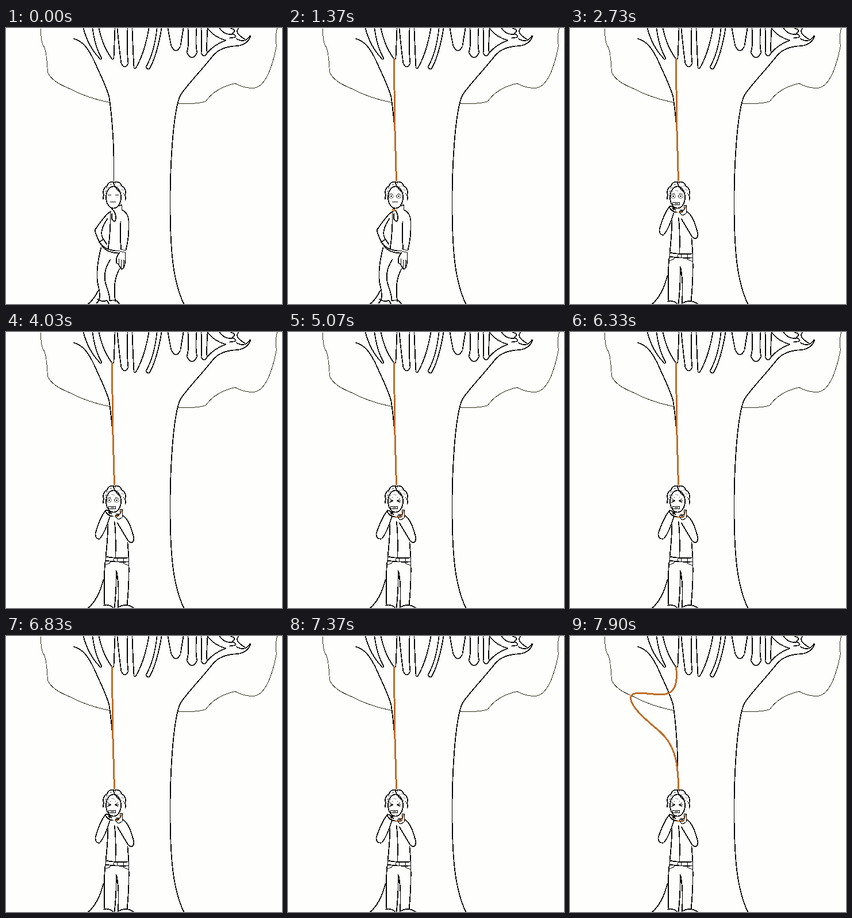
Animation of 480 by 480 pixels, one loop 8 s. Source, as an HTML page:

```html
<!DOCTYPE html>
<html lang="en">
<head>
<meta charset="utf-8">
<title>Man under a tree</title>
<style>
  html, body { margin: 0; width: 100%; height: 100%; overflow: hidden; background: #fefefc; }
  svg { display: block; width: 100vw; height: 100vh; }
  path, ellipse { fill: none; stroke: #000; stroke-width: 1.7; stroke-linejoin: round; shape-rendering: crispEdges; }
  .thin, .leaf { stroke-width: 1; }
  .leaf { stroke: #2a2a18; }
  .rope { stroke: #bc6f2a; stroke-width: 3; }
  .noose { stroke: #bc6f2a; stroke-width: 2; }
  .dot { fill: #000; stroke: none; }
</style>
</head>
<body>
<!-- Coordinates name pixel centres -->
<svg id="stage" viewBox="-.5 -.5 480 480"></svg>
<script>
const stage = document.getElementById("stage");

function add(parent, tag, attrs = {}) {
  const el = document.createElementNS("http://www.w3.org/2000/svg", tag);
  for (const key in attrs) el.setAttribute(key, attrs[key]);
  return parent.appendChild(el);
}
const group = () => add(stage, "g");
const path = (g, d, cls = "") => add(g, "path", { d, class: cls });
const oval = (g, cx, cy, rx, ry = rx, cls = "") => add(g, "ellipse", { cx, cy, rx, ry, class: cls });

// A branch hanging from the top edge: width w at x, rounded tip of radius r
function branch(g, x, w, tipX, tipY, r) {
  const side = edge => `${edge * .7 + tipX * .3} ${tipY * .6}`;
  path(g, `M${x} 0Q${side(x)} ${tipX - r} ${tipY - r}Q${tipX} ${tipY + r} ${tipX + r} ${tipY - r}Q${side(x + w)} ${x + w} 0`);
}

function drawTree() {
  const g = group();
  path(g, "M60 0Q60 24 65 31T72 77Q80 93 108 104Q142 122 180 129", "leaf");
  path(g, "M471 0Q467 18 470 30Q456 103 429 104Q413 104 398 96Q364 103 347 127Q334 132 298 131", "leaf");
  path(g, "M117 18C131 22 141 31 153 57C164 82 175 103 179 120C184 155 188 205 187 266");
  path(g, "M425 13C421 25 412 31 396 31C375 33 365 40 356 52C335 78 315 98 303 116C290 142 285 240 285 300C285 390 290 440 309 480");
  branch(g, 134, 16, 164, 54, 2);
  branch(g, 161, 28, 185, 54, 2);
  branch(g, 193, 18, 206, 67, 6);
  branch(g, 219, 29, 224, 70, 2);
  branch(g, 262, 8, 247, 71, 4);
  branch(g, 281, 27, 295, 39, 8);
  branch(g, 316, 15, 323, 51, 9);
  branch(g, 339, 11, 344, 48, 5);
  path(g, "M349 43Q362 28 382 21Q362 16 350 0M371 0Q380 13 395 10");
  path(g, "M390 0Q402 3 393 9Q407 16 388 17M404 0Q396 8 415 19M424 13Q415 27 400 18");
}

function drawHead() {
  const g = group();
  oval(g, 186.5, 294, 13, 19);
  let hair = "";
  for (let a = 0.9 * Math.PI; a <= 2.14 * Math.PI; a += 0.05) {
    const lobe = 0.95 + 0.09 * Math.abs(Math.sin(a * 4));
    hair += `${hair ? "L" : "M"}${188 + 19.5 * lobe * Math.cos(a)} ${290 + 23 * lobe * Math.sin(a)}`;
  }
  path(g, hair);
  path(g, "M186 268Q190 280 200 287");
  for (let i = 0; i < 12; i++) {
    const a = Math.PI * (1.05 + i * 0.082);
    oval(g, 188 + 16.5 * Math.cos(a), 290 + (i % 2 ? 16 : 20) * Math.sin(a), 0.7, 0.7, "dot");
  }
}

function drawCalm() {
  const g = group();
  // Jacket, arm on the hip, hanging arm
  path(g, "M183 313Q194 324 189 336Q181 334 184 322M181 318Q182 350 177 385");
  path(g, "M182 318Q172 324 154 351Q156 361 165 377M176 331Q160 354 169 367L175 376M161 372L169 367");
  path(g, "M195 309L201 307V316Q212 320 213 336Q214 362 208 386M199 336Q197 360 200 385");
  // Belt and hand
  path(g, "M164 374Q174 388 198 387M166 378Q175 391 197 391");
  path(g, "M198 384L209 387M198 388L208 390", "thin");
  path(g, "M197 390Q189 400 192 409Q195 408 199 418Q208 422 207 390");
  path(g, "M196 400V412M200 402V418M204 402V416", "thin");
  // Legs, feet, root
  path(g, "M165 381Q154 424 160 448T157 478M181 402Q166 425 174 448T179 474M197 418Q184 442 190 476");
  path(g, "M158 471Q168 477 175 473L179 480M180 474Q192 470 197 480M142 480Q152 472 160 456");
  path(g, "M180 302H190", "thin");
  return g;
}

function drawStanding() {
  const g = group();
  // Jacket, belt, pockets
  path(g, "M177 334Q176 365 173 390M188 329Q191 345 190 392M211 365L213 392");
  path(g, "M173 390Q190 394 213 392V400M172 397Q190 400 213 399M173 390V399M187 393V399M193 393V399M204 393V399");
  path(g, "M172 404Q180 403 182 398M203 400Q205 404 213 405", "thin");
  // Legs, feet, root
  path(g, "M172 399Q169 430 171 476M213 400Q214 435 210 476M191 414Q192 445 188 480M192 416Q197 445 194 480");
  path(g, "M169 475Q178 472 186 479M195 478Q210 470 222 480M142 480Q160 465 169 430");
  path(g, "M178 303H190V307H178ZM181 305H187", "thin");
  for (let i = 0; i < 5; i++) oval(g, 178 + i * 3, 284 + 3 * Math.sin(i * 2), 0.6, 0.6, "dot");
  return g;
}

// Both hands at the neck; pull is 0 or 1
function drawArms(pull) {
  const g = group();
  const elbow = 155 - 2 * pull, y = 318 + pull;
  path(g, pull ? "M179 319Q188 323 197 321L201 309" : "M189 321Q202 316 200 308", "noose");
  path(g, `M174 309Q164 318 ${elbow} 350Q${elbow} 361 163 359Q173 345 180 321`);
  path(g, "M203 319Q214 325 222 358Q221 370 212 363L193 331");
  path(g, `M172 ${y - 7}Q177 ${y + 2} 186 ${y + 2}M174 ${y - 9}L183 ${y - 5}M177 ${y - 5}L184 ${y - 2}M178 ${y}L181 ${y - 6}`);
  path(g, `M190 ${y}Q193 ${y + 12} 202 ${y + 3}V${y - 10}H198V${y - 2}ZM191 ${y - 3}L197 ${y + 2}M194 ${y - 4}V${y + 3}`, "thin");
  return g;
}

function drawEyes() {
  const shut = group(), open = group(), squeeze = group();
  for (const x of [179, 192]) {
    path(shut, `M${x - 3} 290H${x + 3}`, "thin");
    oval(open, x, 292, 3.7, 3.7, "thin");
    oval(open, x, 292, 1.2, 1.2, "dot");
    const out = Math.sign(x - 186) * 3;
    path(squeeze, `M${x + out} 289L${x - out} 293L${x + out} 296M${x + out} 293H${x - out}`, "thin");
  }
  return { shut, open, squeeze };
}

drawTree();
const taut = path(stage, "M184 53L185 160L188 266", "rope");
const slack = path(stage, "M184 53C187 78 184 101 160 101C135 102 106 92 105 107C105 125 140 152 155 165C180 187 188 215 188 266", "rope");
drawHead();
const calm = drawCalm();
const calmNoose = path(stage, "M181 314L183 319L185 315", "noose");
const standing = drawStanding(), hold = drawArms(0), pull = drawArms(1), eyes = drawEyes();

const LOOP = 8000, ROPE = 667, WAKE = 1333, GRAB = 2000, HURRY = 5000, WINCE = 5833, LOOSE = 7833;
const show = (el, on) => { el.style.display = on ? "" : "none"; };

function render(t) {
  const grabbed = t >= GRAB, loose = t >= LOOSE;
  // Tugs alternate three times a second, then six
  const beat = t < HURRY ? Math.floor((t - GRAB) * 3 / 1000) : 9 + Math.floor((t - HURRY) * 6 / 1000);
  const pulling = grabbed && (loose || beat % 2 === 1);
  const wincing = pulling || t >= WINCE;

  show(taut, t >= ROPE && !loose);
  show(slack, loose);
  show(calm, !grabbed);
  show(calmNoose, t >= ROPE && !grabbed);
  show(standing, grabbed);
  show(hold, grabbed && !pulling);
  show(pull, pulling);
  show(eyes.shut, t < WAKE);
  show(eyes.open, t >= WAKE && !wincing);
  show(eyes.squeeze, wincing);
}

const start = performance.now();
function tick() {
  // Small lead keeps changes on their 10 ms marks
  render((performance.now() - start + 4) % LOOP);
  requestAnimationFrame(tick);
}
tick();
</script>
</body>
</html>
```
